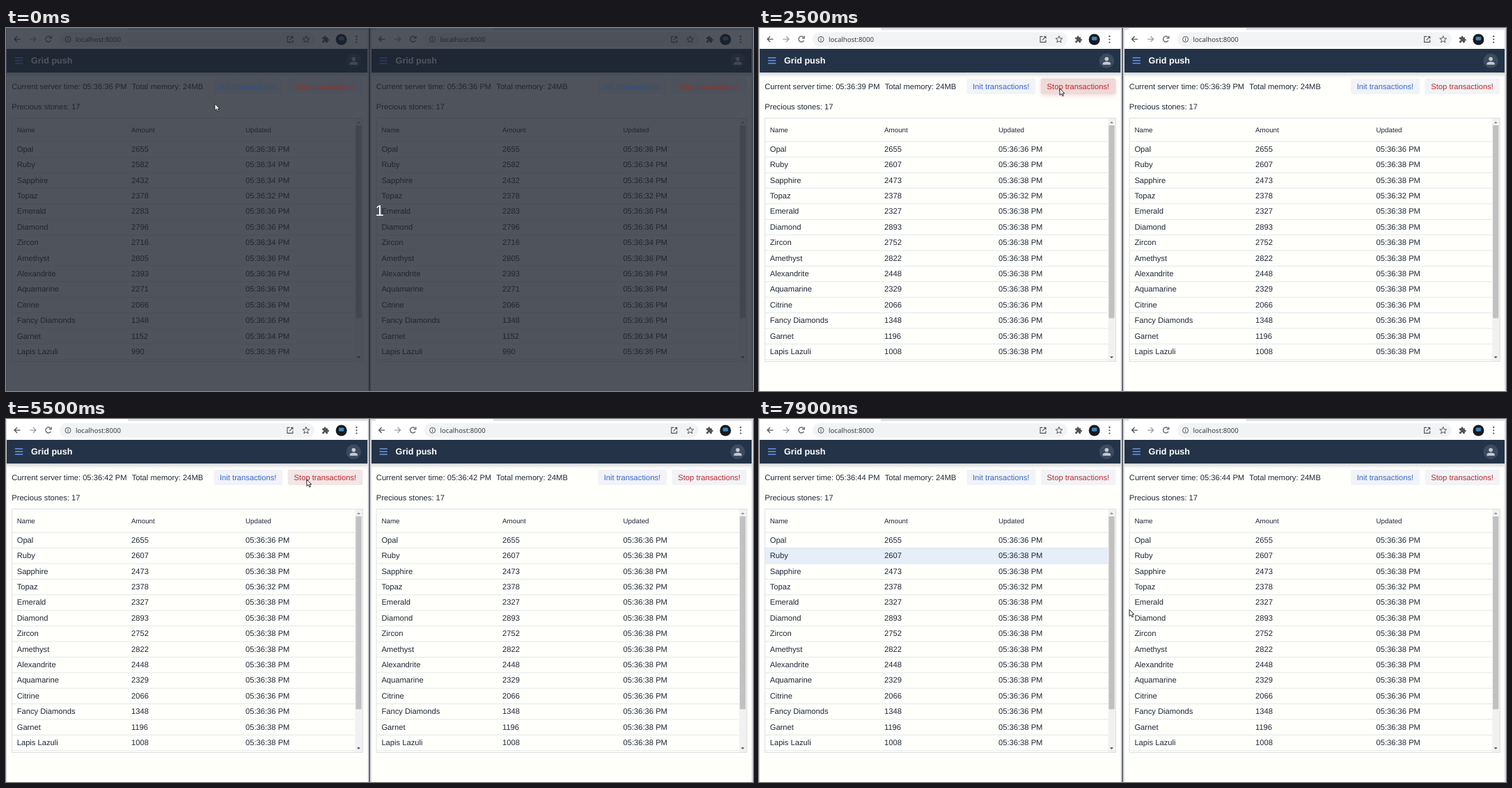
Recreate the animation shown at these times as an HTML page. Size 1073 px wide and 522 px high, loop 8000 ms.

```html
<!DOCTYPE html>
<html lang="en">
<head>
<meta charset="utf-8">
<title>Grid push</title>
<style>
  html, body { margin: 0; width: 100%; height: 100%; overflow: hidden; background: #fffffc; }
  svg { display: block; width: 100%; height: 100%; text-rendering: geometricPrecision; }
  text { font: 11.2px "Liberation Sans", Arial, sans-serif; fill: #1f2836; white-space: pre; }
  .small { font-size: 9.8px; }
  .title { font-size: 12.6px; font-weight: bold; fill: #fff; }
  .url { font: 9.6px "Noto Sans", sans-serif; fill: #3a3d41; }
  .count { font-size: 22px; fill: #fff; }
  .icon { fill: none; stroke: #505357; stroke-width: 1.25; }
</style>
</head>
<body>
<svg id="stage" viewBox="0 0 1073 522" preserveAspectRatio="none"></svg>
<script>
const LOOP = 8000;
const ROW = 22.4;
const TOP = 163.2;

// name, amount and seconds before the push, then after it
const stones = [
  ["Opal", 2655, 36],
  ["Ruby", 2582, 34, 2607],
  ["Sapphire", 2432, 34, 2473],
  ["Topaz", 2378, 32],
  ["Emerald", 2283, 36, 2327],
  ["Diamond", 2796, 36, 2893],
  ["Zircon", 2716, 34, 2752],
  ["Amethyst", 2805, 36, 2822],
  ["Alexandrite", 2393, 36, 2448],
  ["Aquamarine", 2271, 36, 2329],
  ["Citrine", 2066, 36],
  ["Fancy Diamonds", 1348, 36],
  ["Garnet", 1152, 34, 1196],
  ["Lapis Lazuli", 990, 36, 1008]
];

// x: content origin, r: shift of right-aligned parts, cols: column offsets
const panes = [
  { x: 0, r: 0, from: 1, to: 519.5, tab: [0, 175], cols: [15.7, 180, 344], push: 800,
    clock: [[0, 36], [500, 37], [1200, 38], [2300, 39], [3300, 40], [4500, 41], [5500, 42], [6200, 43], [7200, 44]] },
  { x: 523.6, r: 551.7, from: 525, to: 1071, tab: [531, 700], cols: [539.4, 713, 886.5], push: 1000,
    clock: [[0, 36], [800, 37], [2100, 38], [2500, 39], [3500, 40], [4500, 42], [6500, 43], [7500, 44]] }
];

const pointer = [
  [0, 300, 109], [1200, 309, 109], [1400, 326, 107], [1500, 358, 102], [1600, 395, 95],
  [1700, 421, 89], [1800, 432, 87], [5900, 428, 89], [6000, 415, 91], [6100, 398, 92],
  [6200, 384, 90], [6400, 372, 88], [6500, 367, 87], [6700, 319, 120], [6900, 330, 165],
  [7000, 346, 226], [7100, 378, 222], [7200, 409, 212], [7300, 426, 203], [7500, 359, 203],
  [7700, 440, 205], [7800, 505, 240], [7900, 532, 274]
];

const stage = document.getElementById("stage");
const rect = (x, y, w, h, fill, extra = "") =>
  `<rect x="${x}" y="${y}" width="${w}" height="${h}" fill="${fill}" ${extra}/>`;
const text = (x, y, s, extra = "") => `<text x="${x}" y="${y}" ${extra}>${s}</text>`;
const circle = (x, y, r, fill) => `<circle cx="${x}" cy="${y}" r="${r}" fill="${fill}"/>`;
const icon = (x, y, d, extra = "") =>
  `<path class="icon" transform="translate(${x} ${y})" d="${d}" ${extra}/>`;
const stamp = s => `05:36:${s} PM`;
const at = (keys, t) => keys.reduce((last, k) => k[0] <= t ? k : last);

const star = "M" + Array.from({ length: 10 }, (_, i) => {
  const a = i * Math.PI / 5, r = i % 2 ? 2.3 : 5.2;
  return `${(r * Math.sin(a)).toFixed(2)} ${(-r * Math.cos(a)).toFixed(2)}`;
}).join("L") + "Z";
const puzzle = "M20.5 11H19V7c0-1.1-.9-2-2-2h-4V3.5a2.5 2.5 0 0 0-5 0V5H4c-1.1 0-2 .9-2 2v3.8h1.5a2.7 2.7 0 0 1 0 5.4H2V20c0 1.1.9 2 2 2h3.8v-1.5a2.7 2.7 0 0 1 5.4 0V22H17c1.1 0 2-.9 2-2v-4h1.5a2.5 2.5 0 0 0 0-5z";

function browserBar(p) {
  const { x, r } = p;
  return rect(p.from, 0, p.to - p.from, 30, "#fff")
    + rect(p.from, 0, p.to - p.from, 3, "#dee1e6")
    + rect(p.tab[0], 0, p.tab[1] - p.tab[0], 3.2, "#fff")
    + icon(x + 16, 16, "M4.5 0H-4M0-4L-4 0L0 4")
    + icon(x + 39, 16, "M-4.5 0H4M0-4L4 0L0 4", 'style="stroke:#9a9da1"')
    + icon(x + 61, 16, "M3.4 2A4 4 0 1 1 2.8-2.8M4.2-4.6V-1.3H.9")
    + rect(x + 77, 6, 443 + r - x - 77, 20.5, "#f1f3f4", 'rx="10.2"')
    + icon(x + 89, 16.3, "M-4 0A4 4 0 1 1 4 0A4 4 0 1 1-4 0M0-.6V2.3M0-2.3V-1.2", 'style="stroke-width:1"')
    + text(x + 100, 19.8, "localhost:8000", 'class="url"')
    + icon(r + 408, 16.4, "M-.5-4H-4V4H4V.5M1-4H4V-1M4-4L-1 1", 'style="stroke-width:1.1"')
    + icon(r + 431, 16.6, star, 'style="stroke-width:1"')
    + `<path transform="translate(${r + 453.3} 10.8) scale(.47)" d="${puzzle}" fill="#505357"/>`
    + circle(r + 481.7, 16.5, 8, "#17191f")
    + rect(r + 478, 12.5, 7.5, 5.2, "#3f85b5", 'rx="1.5"')
    + [12, 16.3, 20.6].map(y => circle(r + 503.5, y, 1.15, "#505357")).join("");
}

function appBar(p) {
  const { x, r } = p;
  return rect(p.from, 64, p.to - p.from, 7, "url(#shade)")
    + rect(p.from, 30, p.to - p.from, 34, "#243348")
    + [42.8, 46.8, 50.8].map(y => rect(x + 13, y - .7, 11.2, 1.4, "#6d9df2")).join("")
    + text(x + 36, 51.3, "Grid push", 'class="title"')
    + circle(r + 499.4, 47.2, 10.6, "#3d4b5f")
    + circle(r + 499.4, 44.5, 2.8, "#c5cbd4")
    + `<path d="M${r + 493.8} 52.8V51.3C${r + 493.8} 47.7 ${r + 505} 47.7 ${r + 505} 51.3V52.8Z" fill="#c5cbd4"/>`;
}

function grid(p, n) {
  const { x, r, cols } = p;
  const left = x + 8.5, bar = r + 501.5;
  const line = y => rect(left, y, bar - left, 1, "#e3e6ea");
  const tri = (y, d) => `<path d="M${r + 504} ${y}h5l-2.5 ${d}Z" fill="${d > 0 ? "#505050" : "#8f8f8f"}"/>`;
  let out = rect(bar, 130, 11, 349, "#f1f1f1")
    + rect(r + 502.4, 140, 8.2, 277.3, "#c1c1c1")
    + tri(137, -2.7) + tri(472.3, 2.7);
  if (n === 0) out += rect(9, 185.9, 492.5, 22, "#e6eefa", 'id="hover"');
  ["Name", "Amount", "Updated"].forEach((s, i) => out += text(cols[i], 150.3, s, 'class="small"'));
  out += line(162.7);
  stones.forEach((s, i) => {
    const y = TOP + 14.6 + i * ROW;
    out += text(cols[0], y, s[0])
      + text(cols[1], y, s[1], `id="amount${n}-${i}"`)
      + text(cols[2], y, stamp(s[2]), `id="updated${n}-${i}"`)
      + line(TOP - .5 + (i + 1) * ROW);
  });
  return out + rect(left, 129.5, r + 512.5 - left, 350, "none", 'stroke="#dce0e5"');
}

function pane(p, n) {
  return browserBar(p) + appBar(p)
    + text(p.x + 8.2, 87.6, "", `id="clock${n}"`)
    + text(p.x + 180.7, 87.6, "Total memory: 24MB")
    + rect(p.r + 298.5, 72.6, 99, 22.4, "#f1f3f8", `id="init${n}" rx="2.8"`)
    + rect(p.r + 404.8, 72.6, 107.6, 22.4, "#f2f3f7", `id="stop${n}" rx="2.8"`)
    + text(p.x + 8.2, 117.4, "Precious stones: 17")
    + grid(p, n);
}

const labels = panes.map(p =>
  text(p.r + 307, 87.6, "Init transactions!", 'class="init"')
  + text(p.r + 413.6, 87.6, "Stop transactions!", 'class="stop"')).join("");

stage.innerHTML = `<defs>
    <linearGradient id="shade" x2="0" y2="1">
      <stop stop-color="#243348" stop-opacity=".2"/><stop offset="1" stop-color="#243348" stop-opacity="0"/>
    </linearGradient>
    <filter id="blur" x="-20%" y="-50%" width="140%" height="200%"><feGaussianBlur stdDeviation="3"/></filter>
  </defs>`
  + rect(0, 0, 1073, 522, "#fffffc")
  + rect(404.8, 73.5, 107.6, 24, "#c0282c", 'id="glow" rx="4" filter="url(#blur)"')
  + panes.map(pane).join("")
  + rect(0, 0, 1, 522, "#d3d6da")
  + rect(519.5, 0, 5.5, 522, "#d9dbde") + rect(521.2, 0, 1.8, 522, "#5c6065")
  + rect(1071, 0, 2, 522, "#d9dbde")
  + rect(0, 0, 1073, 522, "#1e2430", 'id="veil" opacity=".78"')
  + `<g id="labels">${labels}</g>`
  + text(530.4, 269.5, "1", 'id="count" class="count"')
  + '<path id="pointer" d="M0 0V9.5L2.3 7.5L3.9 11L5.5 10.3L4 7H6.9Z" fill="#fff" stroke="#1d1f24" stroke-width=".95" stroke-linejoin="round"/>';

const el = {};
stage.querySelectorAll("[id]").forEach(e => el[e.id] = e);
const show = (e, on) => e.setAttribute("visibility", on ? "visible" : "hidden");
const fill = (e, c) => e.style.fill = c;
const setText = (e, s) => { if (e.textContent !== s) e.textContent = s; };

function draw(t) {
  const intro = t < 500;
  show(el.veil, intro);
  show(el.count, intro);
  el.labels.querySelectorAll(".init").forEach(e => fill(e, intro ? "#2d527f" : "#3767c8"));
  el.labels.querySelectorAll(".stop").forEach(e => fill(e, intro ? "#86392f" : "#bf272b"));

  panes.forEach((p, n) => {
    setText(el["clock" + n], "Current server time: " + stamp(at(p.clock, t)[1]));
    stones.forEach(([, amount, sec, next], i) => {
      const pushed = next && t >= p.push;
      setText(el[`amount${n}-${i}`], String(pushed ? next : amount));
      setText(el[`updated${n}-${i}`], stamp(pushed ? 38 : sec));
    });
  });

  const [, x, y] = at(pointer, t);
  el.pointer.setAttribute("transform", `translate(${x} ${y})`);

  // the pressed button glows, then settles into its hover tint
  const press = t < 2100 || t > 3300 ? 0 : Math.min(1, (t - 2000) / 300, (3300 - t) / 600);
  el.glow.setAttribute("opacity", (press * .16).toFixed(3));
  const tint = [242, 231, 230].map((c, i) => Math.round(c - press * [4, 13, 13][i]));
  const over = (l, r) => y > 72 && y < 95 && x > l && x < r;
  fill(el.stop0, over(404, 513) ? `rgb(${tint})` : "#f2f3f7");
  fill(el.init0, over(298, 398) ? "#e9edf5" : "#f1f3f8");
  show(el.hover, t >= 7700);
}

const start = performance.now();
function tick() {
  draw((performance.now() - start) % LOOP);
  requestAnimationFrame(tick);
}
tick();
</script>
</body>
</html>
```
